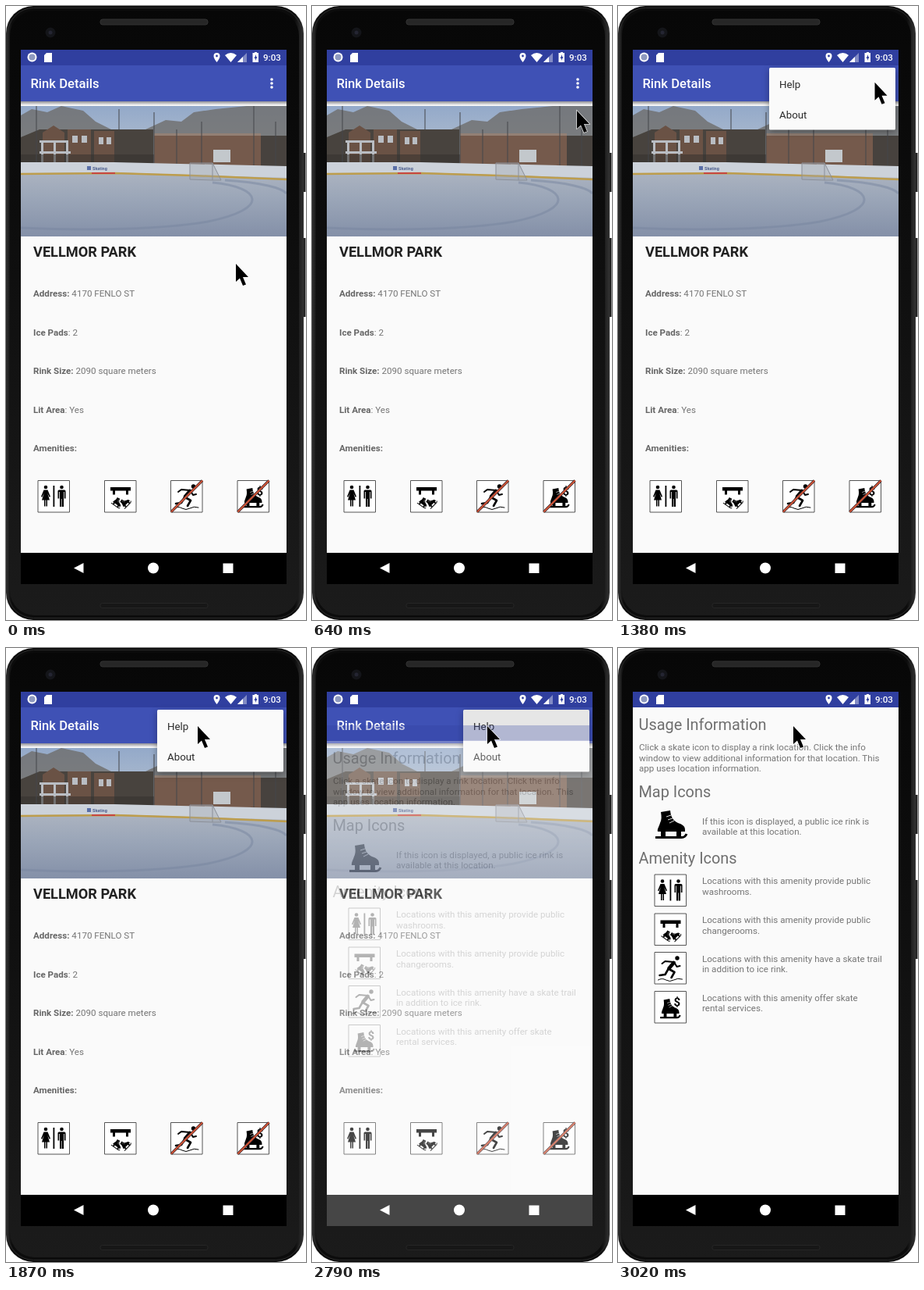
Recreate the animation shown at these times as an HTML page. Size 385 px wide and 786 px high, loop 4640 ms.

```html
<!DOCTYPE html>
<html lang="en">
<head>
<meta charset="utf-8">
<title>Rink Details</title>
<style>
html, body { margin: 0; width: 100%; height: 100%; overflow: hidden; background: #fff }
svg { display: block; width: 385px; height: 786px; font: 11.6px Roboto, Arial, sans-serif }
text { white-space: pre }
.label { font-weight: 700; fill: #666 }
.body { fill: #757575 }
.head { font-size: 19.9px; fill: #6f6f6f }
.item { font-size: 13.3px; fill: #2b2b2b }
#panel { filter: drop-shadow(0 3px 4px rgba(0,0,0,.35)) }
</style>
</head>
<body>
<svg viewBox="0 0 385 786">
<defs>
  <linearGradient id="sky" x2="0" y2="1"><stop stop-color="#93a9c9"/><stop offset="1" stop-color="#bcc6d2"/></linearGradient>
  <linearGradient id="ice" x2="0" y2="1"><stop stop-color="#abb3c0"/><stop offset=".4" stop-color="#9ba6b8"/><stop offset="1" stop-color="#8490a8"/></linearGradient>
  <linearGradient id="shade" x2="0" y2="1"><stop stop-color="#8f8f96"/><stop offset="1" stop-color="#f6f6f6"/></linearGradient>
  <linearGradient id="shell" x2="1" y2="0"><stop stop-color="#2c2c2c"/><stop offset=".02" stop-color="#0c0c0c"/><stop offset=".97" stop-color="#0c0c0c"/><stop offset="1" stop-color="#333"/></linearGradient>
  <linearGradient id="glass" x2="0" y2="1"><stop stop-color="#070707"/><stop offset=".3" stop-color="#0c0c0c"/><stop offset="1" stop-color="#1b1b1b"/></linearGradient>
  <clipPath id="screen"><path d="M19 56H360V740H19z"/></clipPath>
  <clipPath id="photo"><path d="M0 0H341V167H0z"/></clipPath>
  <clipPath id="reveal"><rect id="revealBox" x="170" y="60" width="200" height="125"/></clipPath>

  <g id="boot">
    <path d="M8 2L20 0C21 9 24 13 30 16C36 18 39 20 39 25V27H4C3 24 6 20 7 16C9 12 9 8 8 2zM8 27h6v6H8zM28 27h6v6h-6z"/>
    <path d="M1 34.5H35Q39 34.5 41 30" fill="none" stroke="#000" stroke-width="3"/>
    <path d="M15 8l6-2M17 12l6-2M19 16l6-3" stroke="#ddd"/>
  </g>
  <path id="frame" d="M.5.5h40.5v40.5H.5z" fill="#fff" stroke="#555"/>
  <g id="wash">
    <use href="#frame"/>
    <circle cx="10.500" cy="9" r="2.300"/><circle cx="31" cy="9" r="2.300"/>
    <path d="M8 12.500h5l3.500 8.500-1.300.7-2.400-5 2.700 8.800h-3v8h-1.500v-8h-1v8h-1.500v-8h-3l2.700-8.800-2.400 5-1.300-.7zM20 7h1.800v27H20z"/>
    <path d="M28.500 12.500h5v11.500h-5zM28.500 24h2.200v10h-2.200zM31.300 24h2.200v10h-2.200zM26 14q0-1.500 1.500-1.500h7q1.500 0 1.500 1.500v9.500h-1.700V15h-6.600v8.500H26z"/>
  </g>
  <g id="change">
    <use href="#frame"/>
    <path d="M8 9h26v4.500H31v5h-3v-5H14v5h-3v-5H8z"/>
    <use href="#boot" transform="translate(15 20) rotate(35) scale(.32)"/>
    <use href="#boot" transform="translate(18 29) rotate(-45) scale(.32)"/>
  </g>
  <g id="trail">
    <use href="#frame"/>
    <circle cx="29.500" cy="8" r="2.700"/>
    <g fill="none" stroke="#000" stroke-linecap="round" stroke-linejoin="round">
      <path d="M25 14L19 21" stroke-width="4.600"/>
      <path d="M25 13L14 12L10 15M26 14L29 19L33 18" stroke-width="2"/>
      <path d="M19 22L26 26L22 33M18 22L14 29L7 30" stroke-width="2.600"/>
      <path d="M5 36q5-3 10 0t10 0t11-1"/>
    </g>
  </g>
  <g id="rental">
    <use href="#frame"/>
    <use href="#boot" transform="translate(7 10) scale(.64 .7)"/>
    <text x="25" y="19" font-size="15" font-weight="700">$</text>
  </g>
  <g id="strike" fill="none">
    <path d="M1 40.500L41 .5" stroke="#333" stroke-width="3.200"/>
    <path d="M1 40.500L41 .5" stroke="#c6352c" stroke-width="2.200"/>
    <path d="M1 40.500L41 .5" stroke="#dda04a" stroke-width=".6"/>
  </g>
</defs>

<!-- phone -->
<path d="M380 188h4.500v50H380zM380 297h4.500v101H380z" fill="#222"/>
<rect width="382" height="786" rx="35" fill="url(#shell)"/>
<rect x="2.500" y="2.500" width="377" height="781" rx="33" fill="none" stroke="#2a2a2a"/>
<rect x="5" y="6" width="371" height="774" rx="32" fill="url(#glass)"/>
<rect x="121" y="17" width="138" height="7" rx="3" fill="#262626" stroke="#333"/>
<rect x="121" y="764.500" width="138" height="6" rx="2.500" fill="#171717" stroke="#262626"/>
<circle cx="57" cy="34" r="6.500" fill="#141519"/><circle cx="57" cy="34" r="2.500" fill="#242532"/>

<g clip-path="url(#screen)">
  <!-- details page -->
  <path d="M19 56h341v644H19z" fill="#fafafa"/>
  <path d="M19 700h341v40H19z"/>
  <path d="M19 56h341v20H19z" fill="#303f9f"/>
  <path d="M19 76h341v46H19z" fill="#3f51b5"/>
  <path d="M19 122h341v5H19z" fill="url(#shade)"/>
  <text x="31.500" y="105" font-size="16.600" font-weight="500" fill="#fff">Rink Details</text>
  <g fill="#fff"><circle cx="341" cy="94" r="1.800"/><circle cx="341" cy="99" r="1.800"/><circle cx="341" cy="104" r="1.800"/></g>

  <g transform="translate(19 128)" clip-path="url(#photo)">
    <path d="M0 0h341v80H0z" fill="url(#sky)"/>
    <path d="M0 12L14 4L34 8L52 0L80 6L96 20L116 30L134 36L160 30L186 18L206 20L222 8L250 4L290 0H341V80H0z" fill="#6b6865" opacity=".75"/>
    <path d="M0 40L24 30H170V80H0z" fill="#48433e"/>
    <path d="M28 34l14-9 14 9v38H28zM60 30h30v42H60zM94 32h26v40H94z" fill="#6a5245"/>
    <path d="M24 44h36v3H24zM24 58h40v3H24zM26 44h3v28h-3zM42 44h3v28h-3zM58 44h3v28h-3zM66 38h7v9h-7zM78 38h7v9h-7zM100 40h6v9h-6zM110 40h6v9h-6z" fill="#b9bdc3"/>
    <path d="M0 62h171v13H0z" fill="#35322f" opacity=".55"/>
    <path d="M171 37h137v40H171z" fill="#755a4c"/><path d="M171 35h137v3H171z" fill="#938075"/>
    <path d="M308 38h34v42h-34z" fill="#47423e"/><path d="M247 56h22v16h-22z" fill="#c3c8cc"/>
    <path d="M20 0V74M126 4V30M171 8V74M200 30V74M232 20V74M299 0V76M327 20V78" stroke="#44474b" fill="none"/>
    <path d="M0 72L120 72L341 77V167H0z" fill="#ccd2da"/>
    <path d="M0 86L120 85L341 92V167H0z" fill="url(#ice)"/>
    <path d="M0 87L120 86L220 89L341 94" fill="none" stroke="#bd9d4c" stroke-width="2.500"/>
    <path d="M91 86h30" stroke="#c8473f" stroke-width="2"/>
    <path d="M85 77h5v5h-5z" fill="#5a6fa8"/><text x="92" y="82" font-size="5.500" font-weight="700" fill="#4b5d8e">Skating</text>
    <path d="M217 94V73h29l11 22h-11zM246 73v22" fill="#9ea4ab" fill-opacity=".35" stroke="#8b8f98"/>
    <path d="M246 98C310 104 320 132 240 148C180 158 90 160 0 156M262 95C310 98 335 105 341 112" fill="none" stroke="#7885a0" stroke-width="3" opacity=".5"/>
  </g>

  <text x="35" y="320.500" font-size="18.200" font-weight="700" fill="#212121">VELLMOR PARK</text>
  <g class="body">
    <text x="35" y="372"><tspan class="label">Address:</tspan> 4170 FENLO ST</text>
    <text x="35" y="421.500"><tspan class="label">Ice Pads</tspan>: 2</text>
    <text x="35" y="471"><tspan class="label">Rink Size:</tspan> 2090 square meters</text>
    <text x="35" y="520.500"><tspan class="label">Lit Area</tspan>: Yes</text>
    <text x="35" y="569.500" class="label">Amenities:</text>
  </g>
  <use href="#wash" x="40.500" y="607"/><use href="#change" x="126" y="607"/>
  <use href="#trail" x="211" y="607"/><use href="#strike" x="211" y="607"/>
  <use href="#rental" x="296.500" y="607"/><use href="#strike" x="296.500" y="607"/>

  <g id="menu" clip-path="url(#reveal)">
    <rect id="panel" x="194" y="79" width="162" height="79.500" rx="1.500" fill="#fafafa"/>
    <path id="press" d="M194 79h162v39H194z" opacity="0"/>
    <text x="207" y="104.500" class="item">Help</text>
    <text x="207" y="144" class="item">About</text>
  </g>

  <!-- help page -->
  <g id="help">
    <path d="M19 56h341v20.500H19z" fill="#303f9f"/>
    <path d="M19 76h341v624H19z" fill="#fafafa"/>
    <g class="head">
      <text x="26.500" y="105">Usage Information</text>
      <text x="26.500" y="191">Map Icons</text>
      <text x="26.500" y="276">Amenity Icons</text>
    </g>
    <g id="notes" class="body"></g>
    <use href="#boot" x="47" y="208"/>
    <use href="#wash" x="46.500" y="289.500"/><use href="#change" x="46.500" y="339.500"/>
    <use href="#trail" x="46.500" y="389"/><use href="#rental" x="46.500" y="439"/>
  </g>

  <!-- system icons -->
  <g fill="#fff">
    <circle cx="33.500" cy="65.500" r="6"/><circle cx="33.500" cy="65.500" r="4" fill="#8f9ac0"/>
    <path d="M52 60h7v12H49v-9z"/>
    <path d="M270.500 60a4 4 0 0 1 4 4q0 3-4 8q-4-5-4-8a4 4 0 0 1 4-4z"/><circle cx="270.500" cy="64" r="1.400" fill="#303f9f"/>
    <path d="M281 63q7.500-6 15 0l-7.500 9z"/>
    <path d="M309 60v12h-12z" opacity=".4"/><path d="M304 65v7h-7z"/>
    <path d="M318 60h1v-1h3v1h2v12H316.500V60z"/><path d="M321 62l-2.500 5h1.500v3l2.500-5h-1.500z" fill="#303f9f"/>
    <text x="330" y="70" font-weight="500">9:03</text>
    <path d="M87 719.500L99.500 713v13z"/><circle cx="189" cy="719.500" r="7"/><path d="M278.500 713.500h13v12.500h-13z"/>
  </g>
</g>
<path id="cursor" d="M0 0V23L5 18.500L9 28L13 26.500L9 17H16z" stroke="#fff" stroke-width="1.200" paint-order="stroke"/>
</svg>
<script>
const $ = id => document.getElementById(id);

const notes = [
  [27, 131, 'Click a skate icon to display a rink location. Click the info', 'window to view additional information for that location. This', 'app uses location information.'],
  [108, 225.5, 'If this icon is displayed, a public ice rink is', 'available at this location.'],
  [108, 302, 'Locations with this amenity provide public', 'washrooms.'],
  [108, 352, 'Locations with this amenity provide public', 'changerooms.'],
  [108, 401.5, 'Locations with this amenity have a skate trail', 'in addition to ice rink.'],
  [108, 451.5, 'Locations with this amenity offer skate', 'rental services.']
];
$('notes').innerHTML = notes.map(([x, y, ...lines]) =>
  lines.map((s, i) => `<text x="${x}" y="${y + i * 13.6}">${s}</text>`).join('')).join('');

// Bursts of screen updates: start, end, number of steps
const bursts = [[30, 540, 12], [590, 1100, 9], [1200, 1690, 10], [1740, 1870, 2],
  [2020, 2150, 4], [2530, 2560, 2], [2790, 3020, 6]];

// Keys: time, values...
const path = [[0, 295, 330], [30, 296, 325], [310, 318, 206], [540, 340, 139], [590, 340, 134],
  [850, 342, 96], [1100, 343, 97], [1300, 343, 97], [1690, 260, 101], [1740, 251, 101],
  [1870, 246, 100], [2020, 241, 100], [2150, 225, 100]];
const menuKeys = [[1150, 0, 0], [1200, .35, .5], [1254, .7, .85], [1310, .92, 1], [1400, 1, 1],
  [2790, 1, 1], [2836, 1, .5], [2882, 1, 0]];
const pressKeys = [[2520, 0], [2530, .04], [2560, .08]];
const helpKeys = [[2789, 0, 43], [2790, .28, 43], [2836, .58, 26], [2882, .88, 13.5],
  [2928, 1, 5], [2974, 1, 1.5], [3020, 1, 0]];

// Time of the latest screen update
function snap(t) {
  let s = 0;
  for (const [a, b, n] of bursts) {
    if (t < a) break;
    const d = (b - a) / (n - 1);
    s = Math.min(b, a + Math.floor((t - a) / d + 1e-6) * d);
  }
  return s;
}

function at(keys, t) {
  const i = keys.findIndex(k => k[0] > t);
  if (i === 0) return keys[0].slice(1);
  if (i < 0) return keys.at(-1).slice(1);
  const a = keys[i - 1], b = keys[i], f = (t - a[0]) / (b[0] - a[0]);
  return a.slice(1).map((v, j) => v + (b[j + 1] - v) * f);
}

function draw(now) {
  const t = snap(now % 4640);
  const [x, y] = at(path, t), [open, shown] = at(menuKeys, t), [alpha, shift] = at(helpKeys, t);
  $('cursor').setAttribute('transform', `translate(${x} ${y})`);
  $('menu').setAttribute('opacity', shown);
  $('revealBox').setAttribute('x', 370 - 200 * open);
  $('revealBox').setAttribute('width', 200 * open);
  $('revealBox').setAttribute('height', 125 * open);
  $('press').setAttribute('opacity', at(pressKeys, t)[0]);
  $('help').setAttribute('opacity', alpha);
  $('help').setAttribute('transform', `translate(0 ${shift})`);
  requestAnimationFrame(draw);
}
draw(performance.now());
</script>
</body>
</html>
```
